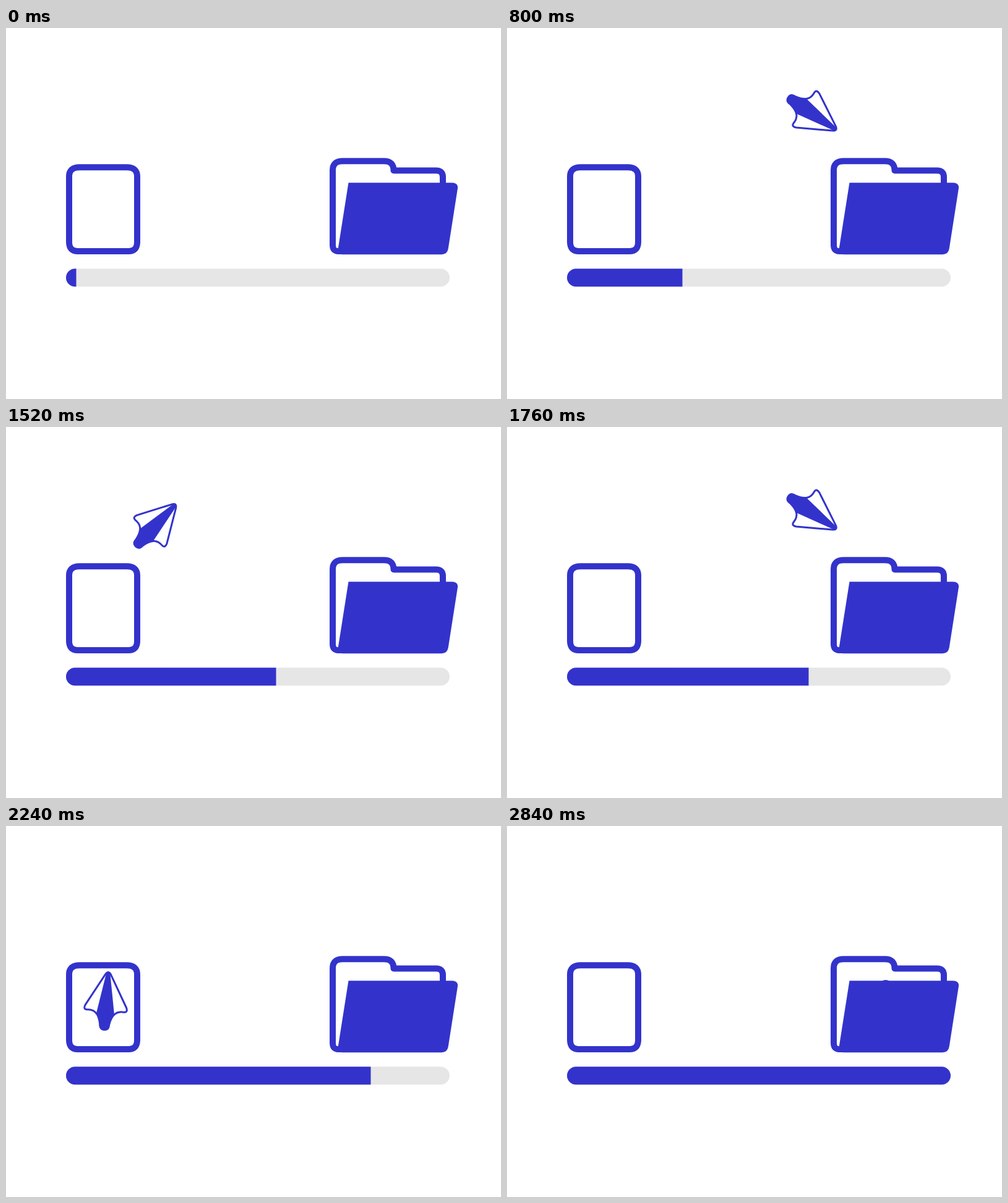
An HTML page for the animation above (2.88 s loop, 800 px wide and 600 px high).

```html
<!DOCTYPE html>
<html lang="en">
<head>
<meta charset="utf-8">
<title>File transfer</title>
<style>
  html, body { margin: 0; width: 100%; height: 100%; overflow: hidden; background: #fff; }
  svg { display: block; width: 100vw; height: 100vh; }
</style>
</head>
<body>
<svg viewBox="0 0 800 600">
  <defs>
    <clipPath id="pill"><rect x="97" y="389.3" width="620" height="29" rx="14.5"/></clipPath>
  </defs>

  <g clip-path="url(#pill)">
    <rect x="97" y="389" width="620" height="30" fill="#e6e6e6"/>
    <rect id="bar" x="97" y="389" height="30" fill="#3333cc"/>
  </g>

  <g fill="none" stroke="#3333cc" stroke-width="10" stroke-linejoin="round">
    <path d="M102 240Q102 225.2 119 225.2H195Q212 225.2 212 240V346Q212 361 198 361H116Q102 361 102 346Z"/>
    <path d="M548 361H537Q528 361 528 351V230Q528 215.3 544 215.3H611Q626.5 215.3 626.5 230.5H695Q706 230.5 706 241V255"/>
  </g>

  <g id="plane" stroke-linejoin="round">
    <path fill="#fff" stroke="#3333cc" stroke-width="3"
      d="M-4.5-42.5Q0-50 4.5-42.5L33.3 9C35 13 35 16.5 30 16.5C19 15.5 11 20 7.5 38
         Q7.5 47 0 47Q-7.5 47-7.5 38C-11 20-19 15.5-30 16.5C-35 16.5-35 13-33.3 9Z"/>
    <path fill="#3333cc"
      d="M-3-45Q0-48 3-45L14.5 21Q10 27 8.5 38Q8.5 48 0 48Q-8.5 48-8.5 38Q-10 27-14.5 21Z"/>
  </g>

  <path fill="#3333cc" d="M553.5 250.2H720Q731 250.2 730 259L714.7 357Q713 366.2 704 366.2H543L536 361L537 355Z"/>
</svg>
<script>
const LOOP = 2880, FLIGHT = 960, STEP = 40;
const TAKEOFF = 212, LANDING = 920, FADE = 200;

// time, x, y of the plane's centre
const route = [
  [212, 157, 297.5], [320, 162, 282.6], [440, 186.3, 232.4], [560, 242, 159],
  [680, 348.5, 83], [800, 493.5, 138.5], [880, 580, 235], [920, 612, 297.5]
];

const bar = document.getElementById('bar');
const plane = document.getElementById('plane');
const clamp = v => Math.min(1, Math.max(0, v));

const slope = (a, b, k) => (b[k] - a[k]) / (b[0] - a[0]);

// Velocity at a waypoint, weighted for uneven spacing
function velocity(i, k) {
  const [a, b, c] = [route[i - 1], route[i], route[i + 1]];
  if (!a) return 0;
  if (!c) return slope(a, b, k);
  const w = (b[0] - a[0]) / (c[0] - a[0]);
  return slope(a, b, k) * (1 - w) + slope(b, c, k) * w;
}

function along(t, k) {
  let i = 0;
  while (i < route.length - 2 && t > route[i + 1][0]) i++;
  const a = route[i], b = route[i + 1], d = b[0] - a[0];
  const s = clamp((t - a[0]) / d), r = 1 - s;
  return r * r * (1 + 2 * s) * a[k] + s * s * (3 - 2 * s) * b[k]
    + s * r * d * (r * velocity(i, k) - s * velocity(i + 1, k));
}

function draw(ms) {
  const t = Math.floor(ms % LOOP / STEP) * STEP;
  const phase = t % FLIGHT;
  const turn = 180 * clamp((phase - TAKEOFF) / (LANDING - TAKEOFF)) ** 2;
  bar.setAttribute('width', 16.5 + t * 0.2125);
  plane.setAttribute('opacity', clamp(phase / FADE));
  plane.setAttribute('transform',
    `translate(${along(phase, 1)} ${along(phase, 2)}) rotate(${turn})`);
}

const start = performance.now();
function tick() {
  draw(performance.now() - start);
  requestAnimationFrame(tick);
}
tick();
</script>
</body>
</html>
```
